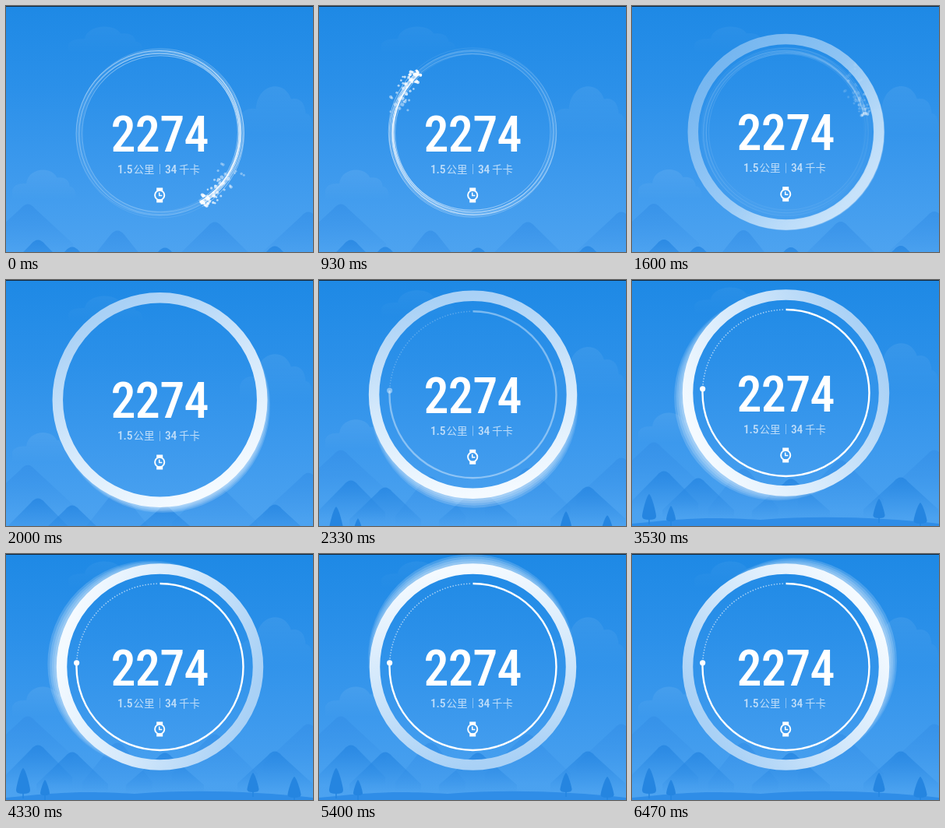
Recreate the animation shown at these times as an HTML page with a canvas. Size 394x316 px, loop 6530 ms.

```html
<!DOCTYPE html>
<html lang="zh">
<head>
<meta charset="utf-8">
<title>Step ring</title>
<style>
html, body { margin: 0; width: 100%; height: 100%; overflow: hidden; background: #2a8ce8; }
canvas { display: block; width: 394px; height: 316px; }
</style>
</head>
<body>
<canvas id="stage" width="394" height="316"></canvas>
<script>
const W = 394, H = 316, LOOP = 6530, STEP = 66.67;
const CX = 197.5, TAU = Math.PI * 2;
const ctx = document.getElementById('stage').getContext('2d');

const rad = d => d * Math.PI / 180;
const lerp = (a, b, k) => a + (b - a) * k;
const white = a => `rgba(255,255,255,${a})`;
const span = (t, a, b) => Math.min(1, Math.max(0, (t - a) / (b - a)));
const smooth = (t, a, b) => { const k = span(t, a, b); return k * k * (3 - 2 * k); };
const noise = n => { const v = Math.sin(n * 127.1 + 11.7) * 43758.5453; return v - Math.floor(v); };

function gradient(x0, y0, x1, y1, ...stops) {
  const g = ctx.createLinearGradient(x0, y0, x1, y1);
  stops.forEach((c, i) => g.addColorStop(i / (stops.length - 1), c));
  return g;
}

function disc(x, y, r) {
  ctx.beginPath();
  ctx.arc(x, y, r, 0, TAU);
  ctx.fill();
}

function arc(x, y, r, from = 0, to = TAU) {
  ctx.beginPath();
  ctx.arc(x, y, r, from, to);
  ctx.stroke();
}

// Flat-bottomed cloud: three bumps over a fading body
function cloud(x, y, w, h, alpha) {
  ctx.fillStyle = gradient(0, y, 0, y + h, white(alpha), white(0));
  ctx.beginPath();
  ctx.moveTo(x, y + h);
  ctx.lineTo(x, y + h * .65);
  ctx.quadraticCurveTo(x + w * .04, y + h * .42, x + w * .22, y + h * .45);
  ctx.bezierCurveTo(x + w * .25, y - h * .1, x + w * .62, y - h * .15, x + w * .7, y + h * .25);
  ctx.quadraticCurveTo(x + w * .88, y + h * .2, x + w * .9, y + h * .55);
  ctx.quadraticCurveTo(x + w, y + h * .55, x + w, y + h);
  ctx.fill();
}

function hill(x, y, half, h, color, alpha) {
  ctx.fillStyle = gradient(0, y, 0, y + h, `rgba(${color},${alpha})`, `rgba(${color},0)`);
  ctx.beginPath();
  ctx.moveTo(x - half, y + h);
  ctx.lineTo(x - half, y + h * .8);
  ctx.lineTo(x - 9, y + 6);
  ctx.quadraticCurveTo(x, y - 5, x + 9, y + 6);
  ctx.lineTo(x + half, y + h * .8);
  ctx.lineTo(x + half, y + h);
  ctx.fill();
}

function tree(x, y, w, h) {
  ctx.fillStyle = '#2585e0';
  ctx.beginPath();
  ctx.moveTo(x, y);
  ctx.bezierCurveTo(x + w * .2, y + 2, x + w * .5, y + h * .75, x + w * .5, y + h * .86);
  ctx.quadraticCurveTo(x + w * .5, y + h, x, y + h);
  ctx.quadraticCurveTo(x - w * .5, y + h, x - w * .5, y + h * .86);
  ctx.bezierCurveTo(x - w * .5, y + h * .75, x - w * .2, y + 2, x, y);
  ctx.fill();
  ctx.fillRect(x - .8, y + h - 1, 1.6, 7);
}

function scenery(t) {
  const low = 1 - smooth(t, 1530, 2680);
  ctx.fillStyle = gradient(0, 0, 0, H, '#1e89e5', '#2b90e9', '#3c99ed', '#4da3f0');
  ctx.fillRect(0, 0, W, H);

  cloud(80, 10 + 17 * low, 96, 34, .045);
  cloud(300, 82 + 22 * low, 94, 62, .07);
  cloud(8, 171 + 40 * low, 82, 38, .08);

  const far = 46 * low;
  [[28, 208, 58], [143, 242, 45], [268, 231, 55], [388, 218, 58]]
    .forEach(([x, y, half]) => hill(x, y + far, half, 64, '52,143,231', .7));

  const near = 55 * low;
  [[85, 254, 46], [41, 245, 44], [204, 255, 50], [345, 253, 48]]
    .forEach(([x, y, half]) => hill(x, y + near, half, 52, '37,133,225', .8));

  const front = 75 * low;
  ctx.fillStyle = '#2f8de7';
  ctx.beginPath();
  ctx.moveTo(0, 313 + front);
  ctx.bezierCurveTo(70, 306 + front, 100, 304 + front, 165, 308 + front);
  ctx.bezierCurveTo(240, 302 + front, 320, 305 + front, W, 313 + front);
  ctx.lineTo(W, H + front);
  ctx.lineTo(0, H + front);
  ctx.fill();
  [[22, 275, 18, 33], [50, 290, 12, 20], [317, 281, 15, 25], [370, 286, 17, 27]]
    .forEach(([x, y, w, h]) => tree(x, y + front, w, h));

  ctx.fillStyle = '#15293b';
  ctx.fillRect(0, 0, W, 1);
}

// Bundle of thin lines with a bright head that sheds sparks
function comet(t, cy) {
  const alpha = 1 - smooth(t, 1400, 1700);
  if (!alpha) return;
  const head = rad(60 + .18 * t);
  ctx.save();
  ctx.globalAlpha = alpha;
  const trail = ctx.createConicGradient(head, CX, cy);
  [[0, .14], [.3, .2], [.55, .4], [.8, .62], [1, .8]]
    .forEach(([at, a]) => trail.addColorStop(at, white(a)));
  ctx.strokeStyle = trail;
  for (let i = 0; i < 9; i++) {
    const a = head + i * 2.4;
    ctx.lineWidth = i % 3 ? .6 : 1.1;
    arc(CX + 1.5 * Math.cos(a), cy + 1.5 * Math.sin(a), 100.5 + i * .9);
  }
  ctx.lineWidth = 1.7;
  const bright = ctx.createConicGradient(head, CX, cy);
  [[0, 0], [.55, 0], [.85, .5], [.95, .75], [1, .4]]
    .forEach(([at, a]) => bright.addColorStop(at, white(a)));
  ctx.strokeStyle = bright;
  arc(CX, cy, 102.5);

  for (let i = 0; i < 54; i++) {
    const age = (noise(i) + t / 900) % 1;
    const r = 103.5 + (noise(i + 60) - .45) * (9 + 30 * age);
    const a = head - rad(age ** 1.5 * 34);
    ctx.fillStyle = white(.95 - .6 * age);
    disc(CX + r * Math.cos(a), cy + r * Math.sin(a), 1.2 + 1.3 * noise(i + 120));
  }
  ctx.restore();
}

function halo(t, cy) {
  const alpha = smooth(t, 1400, 1750);
  if (!alpha) return;
  const r = t < 1800 ? lerp(106, 132.5, smooth(t, 1400, 1800))
                     : lerp(132.5, 126, smooth(t, 1800, 2500));
  const a = rad(62 + .0585 * (t - 2000));
  const dx = Math.cos(a), dy = Math.sin(a);
  const reach = 3 * smooth(t, 1400, 2400);
  const along = (...stops) =>
    gradient(CX + dx * r, cy + dy * r, CX - dx * r, cy - dy * r, ...stops);
  ctx.save();
  ctx.globalAlpha = alpha;
  ctx.lineWidth = 13.5;
  ctx.strokeStyle = along(white(.17), white(.1), white(0), white(0), white(0));
  for (let i = 4; i > 0; i--) arc(CX + dx * reach * i, cy + dy * reach * i, r);
  ctx.strokeStyle = along('#f4faff', '#d3e8fb', '#a9d1f6');
  arc(CX, cy, r);
  ctx.restore();
}

function progress(t, cy) {
  const alpha = smooth(t, 2070, 2680);
  if (!alpha) return;
  const r = 107, top = -Math.PI / 2, end = rad(182.8);
  ctx.save();
  ctx.globalAlpha = alpha;
  ctx.strokeStyle = ctx.fillStyle = '#fff';
  ctx.lineWidth = 2.4;
  arc(CX, cy, r, top, end);
  disc(CX + r * Math.cos(end), cy + r * Math.sin(end), 3.6);
  ctx.fillStyle = white(.6);
  for (let d = 186; d < 269; d += 1.9)
    disc(CX + r * Math.cos(rad(d)), cy + r * Math.sin(rad(d)), .85);
  ctx.restore();
}

const HAN = '"Noto Sans CJK SC", "Noto Sans CJK", sans-serif';
const DIGITS = '"Roboto Condensed", ' + HAN;

function label(text, x, y, font, color, tracking = 0) {
  ctx.font = font;
  ctx.fillStyle = color;
  ctx.letterSpacing = tracking + 'px';
  ctx.fillText(text, x, y);
}

function number(text, x, y, size, color) {
  const font = `500 ${size}px ${DIGITS}`;
  ctx.font = font;
  ctx.letterSpacing = '0px';
  // tight tracking: each digit advances .49 em
  label(text, x, y, font, color, size * .49 - ctx.measureText('0').width);
}

function readout(cy) {
  const y = cy + 51.5, soft = white(.68);
  number('2274', 134.5, cy + 23.5, 64, '#fff');
  number('1.5', 143, y, 15.5, soft);
  number('34', 204, y, 15.5, soft);
  label('公里', 163.5, y, `13.5px ${HAN}`, soft);
  label('千卡', 222, y, `13.5px ${HAN}`, soft);
  ctx.fillStyle = white(.4);
  ctx.fillRect(197, cy + 40, 1, 13);
}

function watch(cy) {
  const x = CX - .3, y = cy + 80;
  ctx.fillStyle = ctx.strokeStyle = '#fff';
  ctx.fillRect(x - 4, y - 9.5, 8, 4);
  ctx.fillRect(x - 4, y + 5.5, 8, 4);
  ctx.lineWidth = 1.9;
  arc(x, y, 6.1);
  ctx.lineWidth = 1.5;
  ctx.beginPath();
  ctx.moveTo(x - .5, y - 3.5);
  ctx.lineTo(x - .5, y + .6);
  ctx.lineTo(x + 3.2, y + .6);
  ctx.stroke();
}

function draw(now) {
  const t = Math.floor((now % LOOP + 4) / STEP) * STEP;
  const cy = lerp(163, 145, smooth(t, 1400, 2600));
  scenery(t);
  comet(t, cy);
  halo(t, cy);
  progress(t, cy);
  readout(cy);
  watch(cy);
}

let start;
function tick(now) {
  start ??= now;
  draw(now - start);
  requestAnimationFrame(tick);
}
draw(0);
requestAnimationFrame(tick);
</script>
</body>
</html>
```
